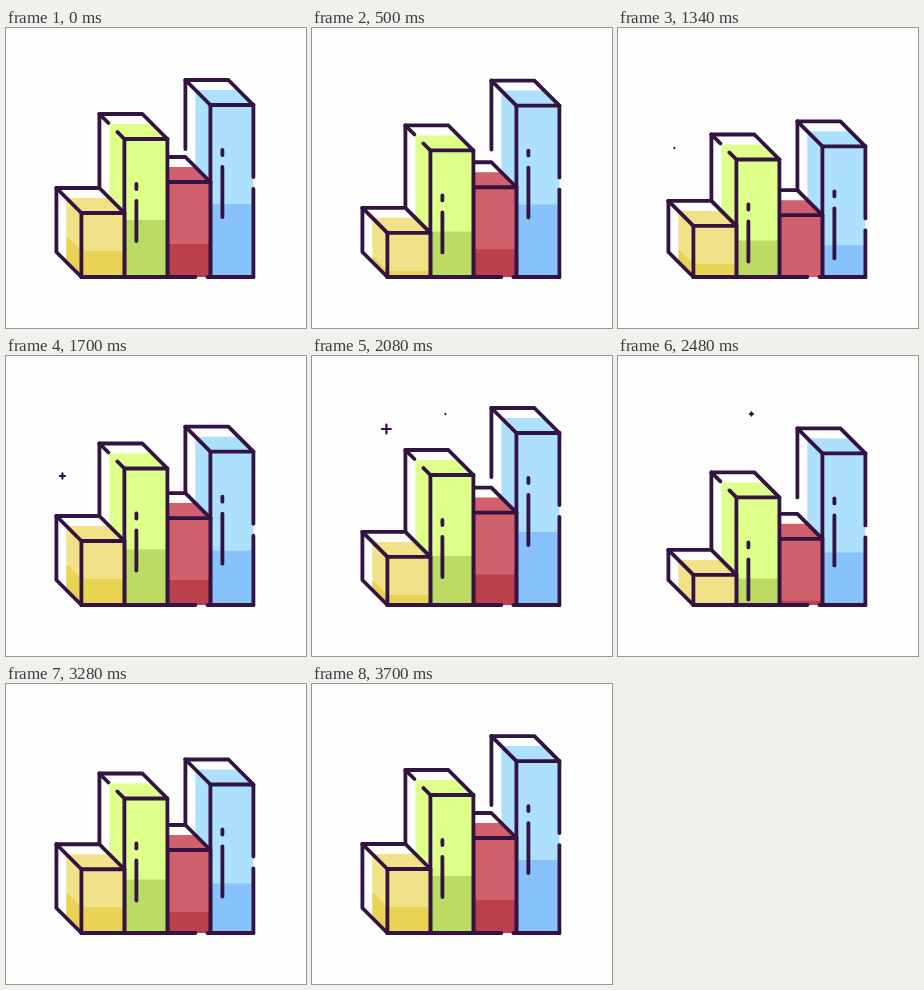
An HTML page with a canvas that plays this animation: 300 px wide and 300 px high, repeating every 3720 ms.

```html
<!DOCTYPE html>
<html lang="en">
<head>
<meta charset="utf-8">
<title>Bar chart</title>
<style>
html, body { margin: 0; width: 100%; height: 100%; overflow: hidden; background: #fdfdfd; }
canvas { display: block; width: 300px; height: 300px; }
</style>
</head>
<body>
<canvas id="stage"></canvas>
<script>
const LOOP = 3720, CYCLE = 1640, BASE = 248, WIDTH = 43, DEPTH = 25;
const PAPER = '#fdfdfd', INK = '#331342';
const canvas = document.getElementById('stage');
const ctx = canvas.getContext('2d');
const dpr = window.devicePixelRatio || 1;
canvas.width = canvas.height = 300 * dpr;

// Back to front; shade, back, gap and tick are measured from the bar's top edge.
const bars = [
  { x: 204, top: 76, drop: 42.3, delay: 440, light: '#ace0fc', dark: '#87c3fa',
    shade: 99, back: 44, gap: [74, 82], tick: [216, 112] },
  { x: 161, top: 153, drop: 39.5, delay: 306, light: '#d0606b', dark: '#ba404c', shade: 62 },
  { x: 118, top: 110, drop: 33.2, delay: 173, light: '#dfff8b', dark: '#bbdb64',
    shade: 81, cut: true, tick: [130, 102] },
  { x: 75, top: 184, drop: 34, delay: 48, light: '#f1e28a', dark: '#e8d352', shade: 38 }
];

function barTop(bar, t) {
  const p = Math.min(Math.max(t - bar.delay, 0), 2 * CYCLE) / CYCLE;
  return bar.top + bar.drop * (1 - Math.cos(2 * Math.PI * p)) / 2;
}

function fill(color, points) {
  ctx.beginPath();
  points.forEach(p => ctx.lineTo(...p));
  ctx.closePath();
  ctx.fillStyle = color;
  ctx.fill();
}

function line(...points) {
  ctx.beginPath();
  points.forEach(p => ctx.lineTo(...p));
  ctx.stroke();
}

// Silhouette of a box with the given depth.
function box(x, y, d) {
  const r = x + WIDTH;
  return [[x - d, y - d], [r - d, y - d], [r, y], [r, BASE], [x, BASE], [x - d, BASE - d]];
}

function drawBar(bar, t) {
  const { x } = bar, r = x + WIDTH, y = barTop(bar, t);
  const level = Math.min(y + bar.shade, BASE);
  fill(PAPER, box(x, y, DEPTH));
  fill(bar.light, box(x, y, 15));
  fill(bar.dark, [[x - 15, level - 15], [x, level], [r, level], [r, BASE], [x, BASE], [x - 15, BASE - 15]]);

  const bx = x - DEPTH, by = y - DEPTH;
  if (bar.back) line([bx, y + bar.back], [bx, by]);
  else line([x, BASE], [bx, BASE - DEPTH], [bx, by]);
  line([bx, by], [r - DEPTH, by], [r, y]);
  if (bar.cut) {
    line([bx, by], [bx + 9, by + 9]);
    line([x - 7, y - 7], [x, y]);
  } else {
    line([bx, by], [x, y]);
  }
  line([x, BASE], [x, y], [r, y]);
  if (bar.gap) {
    line([r, y], [r, y + bar.gap[0] - 2]);
    line([r, y + bar.gap[1] + 2], [r, BASE]);
  } else {
    line([r, y], [r, BASE]);
  }
  if (bar.tick) {
    const [tx, end] = bar.tick;
    line([tx, y + 45], [tx, y + 50]);
    line([tx, y + 62], [tx, y + end]);
  }
}

const sparkles = [[56, 119, 1315], [74, 72, 1840], [133, 57, 2055]];

function drawSparkle([x, y, start], t) {
  const p = (t - start) / 480;
  if (p <= 0 || p >= 1) return;
  const s = 4.5 * Math.sin(Math.PI * p);
  ctx.lineWidth = Math.min(2.2, s * 1.5);
  line([x - s, y], [x + s, y]);
  line([x, y - s], [x, y + s]);
}

function draw(t) {
  ctx.setTransform(dpr, 0, 0, dpr, 0, 0);
  ctx.fillStyle = PAPER;
  ctx.fillRect(0, 0, 300, 300);
  ctx.translate(0.4, 1);
  ctx.strokeStyle = INK;
  ctx.lineCap = ctx.lineJoin = 'round';
  ctx.lineWidth = 3.8;
  bars.forEach(bar => drawBar(bar, t));
  line([75, BASE], [189, BASE]);
  line([201, BASE], [247, BASE]);
  sparkles.forEach(s => drawSparkle(s, t));
}

function frame() {
  draw(performance.now() % LOOP);
  requestAnimationFrame(frame);
}
frame();
</script>
</body>
</html>
```
